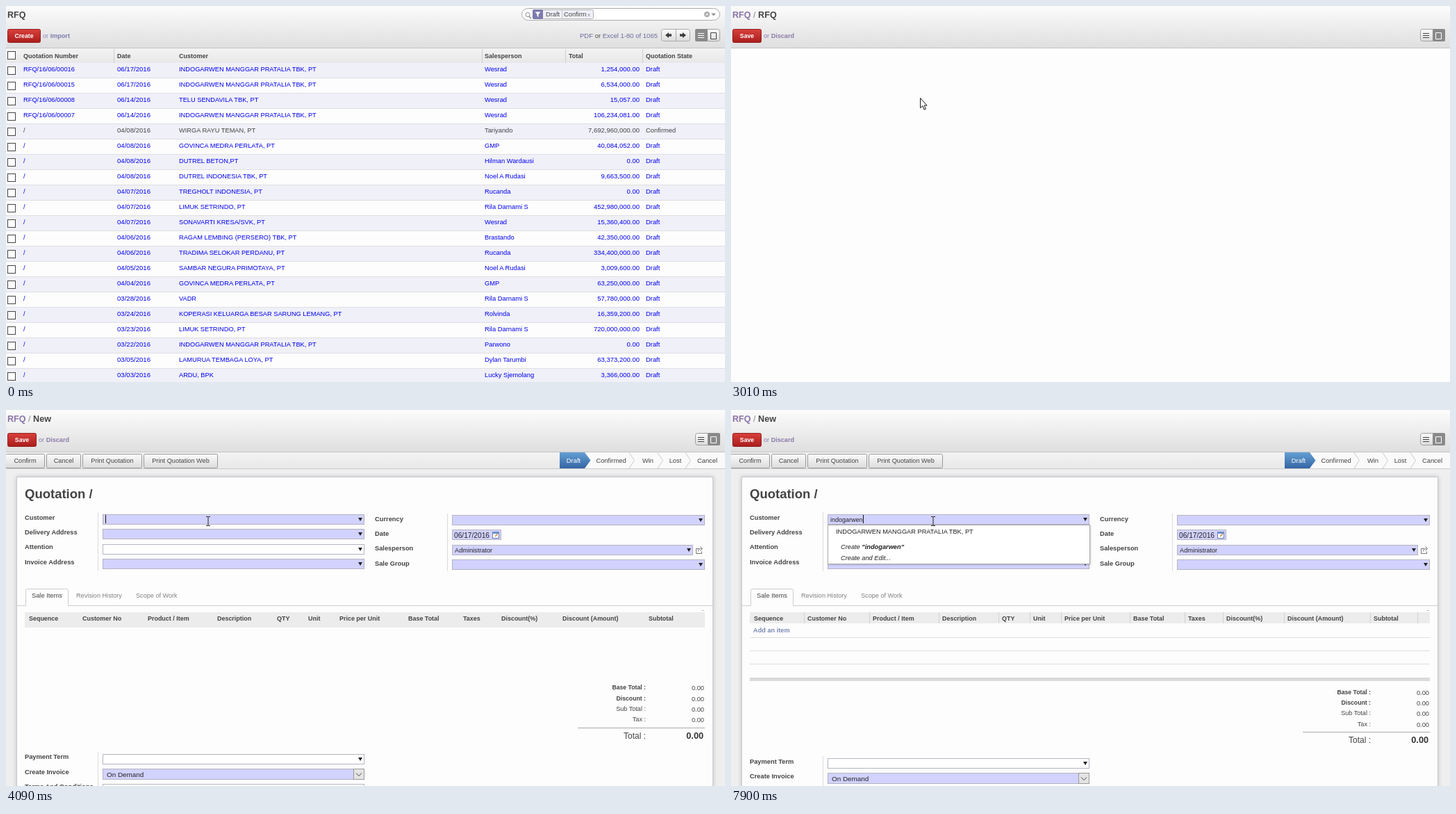
These frames come from a looping animation (1035x541 px, 8000 ms). An HTML page:

```html
<!DOCTYPE html>
<html lang="en">
<head>
<meta charset="utf-8">
<title>Quotation entry</title>
<style>
html, body { margin: 0; height: 100%; overflow: hidden; background: #fdfdfd }
svg { display: block; font-family: "Liberation Sans", Arial, sans-serif }
text { white-space: pre }
</style>
</head>
<body>
<svg id="stage" width="1035" height="541" viewBox="0 0 1035 541"></svg>
<script>
const LOOP = 8000;
const INK = '#434343', DARK = '#222', LINK = '#7c7bad', BLUE = '#0000f0', FIELD = '#d2d2ff';
const BOLD = 'font-weight="bold"', END = 'text-anchor="end"', MID = 'text-anchor="middle"';

const MAIN = 'INDOGARWEN MANGGAR PRATALIA TBK, PT';
const ROWS = `RFQ/16/06/00016|06/17|${MAIN}|Wesrad|1,254,000
RFQ/16/06/00015|06/17|${MAIN}|Wesrad|6,534,000
RFQ/16/06/00008|06/14|TELU SENDAVILA TBK, PT|Wesrad|15,057
RFQ/16/06/00007|06/14|${MAIN}|Wesrad|106,234,081
/|04/08|WIRGA RAYU TEMAN, PT|Tariyando|7,692,960,000
/|04/08|GOVINCA MEDRA PERLATA, PT|GMP|40,084,052
/|04/08|DUTREL BETON,PT|Hilman Wardausi|0
/|04/08|DUTREL INDONESIA TBK, PT|Noel A Rudasi|9,663,500
/|04/07|TREGHOLT INDONESIA, PT|Rucanda|0
/|04/07|LIMUK SETRINDO, PT|Rila Darnami S|452,980,000
/|04/07|SONAVARTI KRESA/SVK, PT|Wesrad|15,360,400
/|04/06|RAGAM LEMBING (PERSERO) TBK, PT|Brastando|42,350,000
/|04/06|TRADIMA SELOKAR PERDANU, PT|Rucanda|334,400,000
/|04/05|SAMBAR NEGURA PRIMOTAYA, PT|Noel A Rudasi|3,009,600
/|04/04|GOVINCA MEDRA PERLATA, PT|GMP|63,250,000
/|03/28|VADR|Rila Darnami S|57,780,000
/|03/24|KOPERASI KELUARGA BESAR SARUNG LEMANG, PT|Rolvinda|16,359,200
/|03/23|LIMUK SETRINDO, PT|Rila Darnami S|720,000,000
/|03/22|${MAIN}|Parwono|0
/|03/05|LAMURUA TEMBAGA LOYA, PT|Dylan Tarumbi|63,373,200
/|03/03|ARDU, BPK|Lucky Sjemolang|3,366,000`.split('\n').map(r => r.split('|'));

const INC_HITS = ['DRAGINCEL RESOURCES, PT', 'GOVINCA MEDRA PERLATA, PT', 'KARUMINCA MANDIRI, PT',
  'Vrinca Toolmech, PT.', 'PRINCEVAL ENERGY INDONESIA, PT'];
const INDO_HITS = ['DUTREL INDONESIA TBK, PT', MAIN, 'INDOVELAR MANDIRI, PT', 'LIMUK SETRINDO, PT',
  'PRINCEVAL ENERGY INDONESIA, PT', 'TREGHOLT INDONESIA, PT', 'WALINDO TEMARA, PT'];

const TYPING = [[0, ''], [4950, 'i'], [5020, 'in'], [5180, 'inc'], [5640, 'inco'], [6110, 'in'],
  [6340, 'ind'], [6570, 'indo'], [6880, 'indog'], [7050, 'indoga'], [7120, 'indogar'],
  [7200, 'indogarw'], [7350, 'indogarwe'], [7500, 'indogarwen']];

const PATH = [[220, 608, 468], [350, 134, 238], [740, 35, 56], [1000, 39, 45], [1230, 39, 45], [1460, 170, 65],
  [1800, 262, 134], [2000, 269, 120], [2070, 276, 117], [2240, 273, 121], [3010, 272, 132],
  [3170, 284, 144], [3500, 291, 160]];

const pen = document.createElement('canvas').getContext('2d');
pen.font = '9px "Liberation Sans", Arial, sans-serif';

// y is the vertical centre of the line; baselines sit on whole pixels
const text = (x, y, s, fill = INK, size = 9.3, attrs = '') =>
  `<text x="${x}" y="${Math.round(y + size * .36)}" fill="${fill}" font-size="${size}" ${attrs}>${s}</text>`;
const rect = (x, y, w, h, fill, attrs = '') =>
  `<rect x="${x}" y="${y}" width="${w}" height="${h}" fill="${fill}" ${attrs}/>`;
const box = (x, y, w, h, fill, stroke, rx = 0) =>
  rect(x + .5, y + .5, w - 1, h - 1, fill, `stroke="${stroke}" rx="${rx}"`);
const path = (d, stroke, fill = 'none', width = 1) =>
  `<path d="${d}" stroke="${stroke}" fill="${fill}" stroke-width="${width}"/>`;
const gradient = (id, a, b) =>
  `<linearGradient id="${id}" x2="0" y2="1"><stop stop-color="${a}"/><stop offset="1" stop-color="${b}"/></linearGradient>`;

const DEFS = '<defs>' + gradient('head', '#fcfcfc', '#dedede') + gradient('red', '#d9413c', '#a91d1d') +
  gradient('button', '#fbfbfb', '#dcdcdc') + gradient('columns', '#f3f3f3', '#e8e8e8') +
  gradient('status', '#659fd3', '#3465a4') + '</defs>';

const redButton = (label, w, hover) =>
  box(2, 33, w, 20, 'url(#red)', hover ? '#d84a45' : '#96201d', 2) +
  text(2 + w / 2, 43.3, label, '#fff', 8.7, `${BOLD} ${MID}${hover ? ' text-decoration="underline"' : ''}`) +
  (hover ? rect(46, 48, 3, 4, '#431010') : '');

const pager = (x, y) => box(x, y, 42, 18, 'url(#button)', '#ababab', 3) + path(`M${x + 21.5} ${y}v18`, '#ababab') +
  [[x + 11, 1], [x + 31, -1]].map(([c, s]) =>
    path(`M${c - 5 * s} ${y + 9}l${5 * s}-4v2.2h${4 * s}v3.6h${-4 * s}v2.2z`, 'none', '#3c3c3c')).join('');

function viewSwitch(form) {
  const [left, right] = form ? ['#444', '#fff'] : ['#fff', '#444'];
  return box(992, 33, 36, 18, 'url(#button)', '#a0a0a0', 3) + rect(form ? 1010 : 992, 33, 18, 18, '#8a8a8a', 'rx="2"') +
    path('M996 39.5h9m-9 3h9m-9 3h9', left) + path('M1014.5 38.5h8v9h-8z', right);
}

const header = () => rect(0, 0, 1035, 61, 'url(#head)') + rect(0, 60, 1035, 1, '#c4c4c4');

const searchBox = () => box(742, 3, 286, 18, '#fff', '#ababab', 9) +
  '<circle cx="751" cy="12.5" r="3" fill="none" stroke="#888"/>' + path('M753 15l3 3', '#888', 'none', 1.5) +
  box(758, 5, 88, 14, '#f0f0fa', '#afafb6', 2) + rect(758, 5, 15, 14, LINK, 'rx="2"') +
  path('M761.5 8.5h8l-3 3.5v4l-2-1.5v-2.5z', 'none', '#fff') + path('M800.5 6v12', '#c8c8d0') +
  text(777, 12, 'Draft') + text(803, 12, 'Confirm') + text(837, 12, 'x', '#888', 8) +
  '<circle cx="1009" cy="12" r="4" fill="#aaa"/>' + path('M1007.4 10.4l3.2 3.2m0-3.2l-3.2 3.2', '#fff') +
  path('M1015 10.5h7l-3.5 4z', 'none', '#999');

function listView(t) {
  let s = rect(0, 0, 1035, 541, '#fdfdfd') + header() + text(2, 12, 'RFQ', INK, 12.5, BOLD) +
    redButton('Create', 48, t > 800) + text(53, 43, `or <tspan fill="${LINK}" ${BOLD}>Import</tspan>`, '#8a89ba', 9.1) +
    text(826, 42.5, 'PDF <tspan fill="#4c4c4c">or</tspan> Excel 1-80 of 1065', '#6a699f', 9.5) +
    pager(943, 33) + viewSwitch(false) + (t < 1700 ? searchBox() : '') + rect(0, 61, 1035, 21, 'url(#columns)') +
    box(2, 65, 12, 12, '#fff', '#444');
  for (const x of [155.5, 685.5, 805.5, 916.5]) s += path(`M${x} 62v20`, '#cfcfcf');
  [[25, 'Quotation Number'], [160, 'Date'], [249, 'Customer'], [689, 'Salesperson'], [810, 'Total'], [921, 'Quotation State']]
    .forEach(([x, label]) => s += text(x, 72, label, INK, 9, BOLD));
  ROWS.forEach(([ref, date, customer, person, total], i) => {
    const y = 91 + 22 * i, confirmed = i == 4, ink = confirmed ? INK : BLUE;
    s += rect(0, y - 9, 1035, 22, i % 2 ? '#fdfdfd' : '#f0f0f9') + rect(0, y + 12, 1035, 1, '#dedee4') +
      box(2, y - 4, 12, 12, '#fff', '#444') + text(25, y, ref, ink) + text(160, y, date + '/2016', ink, 9.6) +
      text(249, y, customer, ink, 9.25) + text(689, y, person, ink, 9.35) +
      text(912, y, total + '.00', ink, 9.5, END) + text(921, y, confirmed ? 'Confirmed' : 'Draft', ink, 9.4);
  });
  return s;
}

const formHeader = title => rect(0, 0, 1035, 541, '#fdfdfd') + header() +
  text(2, 12, `<tspan fill="#8a74a8">RFQ</tspan> <tspan fill="#888" font-weight="normal">/</tspan> ${title}`, INK, 12.6, BOLD) +
  redButton('Save', 42, false) + text(47, 43, `or <tspan ${BOLD}>Discard</tspan>`, '#8a7aa8', 9.1) + viewSwitch(true);

const label = (x, y, s) => text(x, y, s, INK, 9.3, BOLD);
const arrow = (x, y) => path(`M${x - 3} ${y - 2}h6l-3 5z`, 'none', DARK);
const combo = (x, y, w, fill = FIELD) => box(x, y - 7, w, 15, fill, '#b4b4c2') + arrow(x + w - 6, y);

function statusBar() {
  let s = rect(0, 61, 1035, 24, 'url(#columns)') + rect(0, 84, 1035, 1, '#cacaca') + rect(797, 61, 238, 23, '#fafafa');
  [[-1, 57, 'Confirm'], [58, 50, 'Cancel'], [110, 86, 'Print Quotation'], [198, 107, 'Print Quotation Web']]
    .forEach(([x, w, name]) => s += box(x, 63, w, 21, 'url(#button)', '#999', 2) + text(x + w / 2, 73, name, INK, 9.2, MID));
  for (const x of [897, 938, 978]) s += path(`M${x} 61.5l7.5 11-7.5 11.5`, '#c9c9c9');
  s += path('M797 61h36l8.5 11.5-8.5 11.5h-36z', 'none', 'url(#status)');
  [[817, 'Draft', '#fff'], [871, 'Confirmed'], [924, 'Win'], [963.5, 'Lost'], [1009.5, 'Cancel']]
    .forEach(([x, name, ink]) => s += text(x, 72.5, name, ink, 9.4, MID));
  return s;
}

const COLUMNS = [[33, 'Sequence'], [110, 'Customer No'], [204, 'Product / Item'], [304, 'Description'], [390, 'QTY'],
  [435, 'Unit'], [480, 'Price per Unit'], [579, 'Base Total'], [658, 'Taxes'], [713, 'Discount(%)'],
  [801, 'Discount (Amount)'], [925, 'Subtotal']];

function itemTable(t) {
  const early = t < 3780, ready = t >= 4260, y = early ? 308 : 291;
  let s = rect(27, y, 979, 22, '#ececec') + rect(1002, 288, 2, 1, '#999');
  if (early) s += text(892, 297, `PDF <tspan fill="#4c4c4c" font-weight="normal">or</tspan> Excel`, '#6a699f', 8.9, BOLD) + pager(954, 288);
  COLUMNS.forEach(([x, name], i) => {
    s += text(x, y + 8.7, name, INK, 8.95, BOLD);
    if (ready && i) s += path(`M${x - 4.5} ${y}v16`, '#d2d2d2');
  });
  if (ready) {
    s += path('M988.5 291v16', '#d2d2d2') + rect(27, 307, 979, 21, '#fdfdfd') + text(32, 317, 'Add an item', '#7a8ab4', 9.2, BOLD) +
      rect(27, 385, 979, 5, '#dadada');
    for (const line of [327, 346, 365]) s += rect(27, line, 979, 1, '#dedede');
  }
  return s;
}

function lowerForm(t) {
  const d = t < 4090 ? 17.5 : t < 4260 ? 0 : 6.3;
  let s = '';
  ['Base Total', 'Discount', 'Sub Total', 'Tax'].forEach((name, i) => {
    const y = 399.3 + 15.3 * i + d;
    s += text(921, y, name + ' :', INK, i < 2 ? 8.7 : 9.1, i < 2 ? `${BOLD} ${END}` : END) + text(1005, y + .8, '0.00', INK, 9.3, END);
  });
  s += rect(823, Math.round(456.5 + d), 183, 1, '#aaa') + text(921, 468.5 + d, 'Total :', INK, 12, END) +
    text(1004, 468.5 + d, '0.00', '#333', 12.7, `${BOLD} ${END}`) + rect(132, Math.round(492 + d), 1, 60, '#dcdcdc');
  const y = Math.round(502 + d);
  return s + label(27, 499 + d, 'Payment Term') + combo(139, y, 377, '#fff') + label(27, 520.5 + d, 'Create Invoice') +
    box(139, y + 14, 377, 16, FIELD, '#b4b4c2') + (t > 3320 ? text(145, y + 22.5, 'On Demand', DARK, 9.9) : '') +
    box(500, y + 14, 16, 16, '#e4e4e4', '#999') + path(`M504 ${y + 20.5}l4 4 4-4`, '#444') +
    label(27, 542 + d, 'Terms And Conditions') + box(139, y + 36, 377, 30, '#fff', '#b4b4c2');
}

function popup(hits, query) {
  const lines = hits.map(name => [151, name]);
  if (hits.length > 6) lines.push([158, 'Search More...']);
  lines.push([158, `Create <tspan ${BOLD}>"${query}"</tspan>`], [158, 'Create and Edit...']);
  const lineY = i => 174 + 15.4 * i + (i < hits.length ? 0 : 7.3);
  const height = Math.round(lineY(lines.length - 1) - 155.5);
  return `<g style="filter:drop-shadow(1px 1px 1px #0003)">${box(139, 165, 378, height, '#fff', '#aaa')}</g>` +
    lines.map(([x, s], i) => text(x, lineY(i) + .3, s, DARK, 9.25, x > 151 ? 'font-style="italic"' : '')).join('');
}

function formView(t) {
  const typed = TYPING.findLast(([at]) => t >= at)[1];
  let s = formHeader('New') + rect(0, 85, 1035, 456, '#efeff0') + statusBar() +
    `<g style="filter:drop-shadow(0 0 3px #0003)">${box(15, 96, 1003, 460, '#fdfdfd', '#c8c8d0')}</g>` +
    text(27, 120, 'Quotation /', INK, 18.5, BOLD) + rect(132, 147, 1, 85, '#dcdcdc') + rect(635, 149, 1, 83, '#dcdcdc');
  ['Customer', 'Delivery Address', 'Attention', 'Invoice Address'].forEach((name, i) =>
    s += label(27, 154.7 + 21.2 * i, name) + combo(139, [157, 178, 200, 221][i], 377, i == 2 ? '#fff' : FIELD));
  ['Currency', 'Date', 'Salesperson', 'Sale Group'].forEach((name, i) => {
    s += label(531, 156.7 + 21.2 * i, name);
    if (i != 1) s += combo(642, [158, 0, 201, 222][i], i == 2 ? 347 : 364);
  });
  s += box(642, 172, 71, 15, FIELD, '#b4b4c2') + (t > 3320 ? text(645, 180, '06/17/2016', DARK, 10.2) : '') +
    box(700, 175, 10, 10, '#fff', '#6d7fb0') + rect(700, 175, 10, 3, '#6d8fc8') + path('M704 182l4-4', '#c08a3a', 'none', 1.5) +
    path('M998 199.500h-4.500v7h8v-3m-5 0q0-4 5-4m-2-3l3 3-3 3', '#777') +
    (t >= 3780 ? text(646, 201.5, 'Administrator', DARK, 9.2) : '') +
    path('M16 281.500h12.500v-22q0-2 2-2h57q2 0 2 2v22h928', '#cdcdcd') + text(37, 267, 'Sale Items', INK, 9.3) +
    text(101, 267, 'Revision History', '#808080', 9.15) + text(187, 267, 'Scope of Work', '#808080', 9.15) +
    (t >= 3320 ? itemTable(t) : '') + lowerForm(t) + text(143, 157.7, typed, DARK, 9);
  if (t >= 3320 && (t < 4410 || t >= 4950)) s += rect(143 + Math.round(pen.measureText(typed).width), 151, 1, 12, '#111');
  if (t >= 5580 && t < 6110) s += popup(INC_HITS, 'inc');
  if (t >= 7120) s += t < 7900 ? popup(INDO_HITS, 'indo') : popup([MAIN], 'indogarwen');
  return s;
}

function pointer(t) {
  if (t < 220 || (t >= 360 && t < 740)) return '';
  const next = PATH.findIndex(([at]) => at > t);
  let [, x, y] = PATH.at(-1);
  if (next > 0) {
    const [t0, x0, y0] = PATH[next - 1], [t1, x1, y1] = PATH[next], k = (t - t0) / (t1 - t0);
    x = x0 + (x1 - x0) * k;
    y = y0 + (y1 - y0) * k;
  }
  const hand = t < 2240 && (y < 53 || (y > 61 && y < 83));
  const shape = t >= 3320 ? path('M-3-6.500h2.500l.500.500.500-.500h2.500M0-6V6M-3 6.500h2.500L0 6l.500.500h2.500', DARK)
    : hand ? path('M-2 1Q-.5-1 1 1V7Q2 5.500 3.500 7 5 6 6 7.500 8 7 8 9V14L6 19H-1L-5 12Q-6 9-4 9.500L-2 11Z', '#111', '#fff') +
      path('M3.500 7v3M6 7.500v3', '#111')
    : path('M.5.500V14.500L3.700 11.700 6 17 8.200 16 6 11H10Z', '#111', '#fff');
  return `<g transform="translate(${x.toFixed(1)} ${y.toFixed(1)})">${shape}</g>`;
}

const stage = document.getElementById('stage');
let shown = '';
function draw() {
  const t = performance.now() % LOOP;
  const view = t < 2240 ? listView(t) : t < 3080 ? formHeader('RFQ') : formView(t);
  const picture = DEFS + view + pointer(t);
  if (picture !== shown) stage.innerHTML = shown = picture;
  requestAnimationFrame(draw);
}
draw();
</script>
</body>
</html>
```
